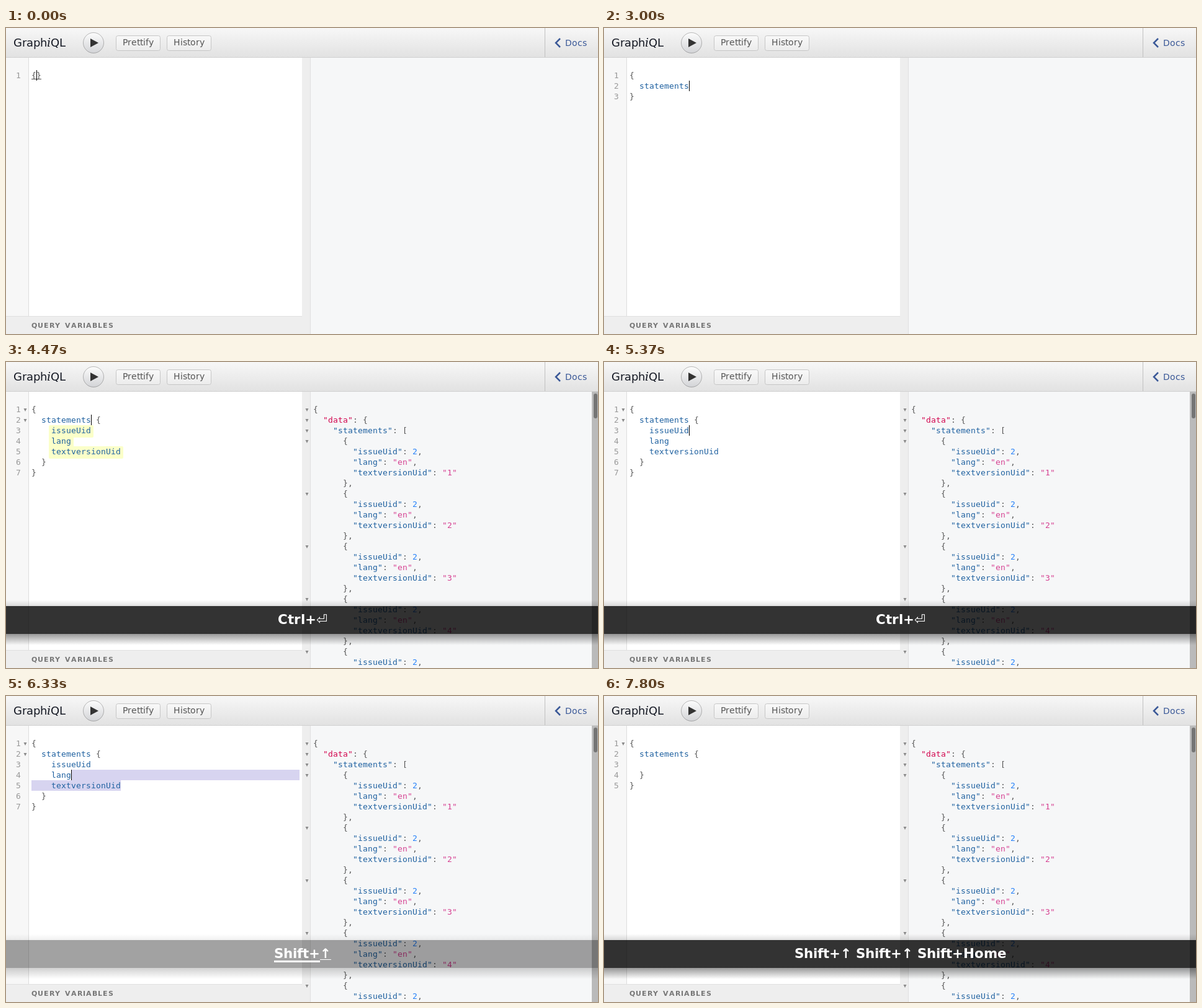
These frames come from a looping animation (954 px wide and 494 px high, 8 s). An HTML page with a canvas:

```html
<!DOCTYPE html>
<html lang="en">
<head>
<meta charset="utf-8">
<title>GraphiQL</title>
<style>
html, body { margin: 0; width: 100%; height: 100%; overflow: hidden; background: #f6f7f8; }
canvas { display: block; width: 954px; height: 494px; }
</style>
</head>
<body>
<canvas id="stage" width="954" height="494"></canvas>
<script>
const ctx = document.getElementById('stage').getContext('2d');
const LOOP = 8000, W = 954, H = 494;
const CHAR = 8, LINE = 17, TOP = 81, LEFT = 41, RESULT = 495;
const SANS = '"DejaVu Sans", sans-serif';
const MONO = '13px "DejaVu Sans Mono", monospace';
const INK = {
  punct: '#555', prop: '#1f61a0', def: '#d2054e', num: '#2882f9',
  str: '#d64292', line: '#999', mark: '#8a8a8a'
};

// Moments of the typed session, in ms
const AT = {
  enter: 600, type: [1050, 1300, 1550, 1800, 2050], down: 2400, pick: 2650,
  run: 3215, result: 3600, moves: [5200, 5400, 5600], end: 5950,
  up1: 6240, up2: 6500, home: 6800, del: 7100
};
const FADE = 200, RECENT = 150, BLINK = 530, FOLD_DELAY = 600;

const hints = ['statement', 'statements', 'statementReference', 'statementReferences'];
const leaves = ['issueUid', 'lang', 'textversionUid'];

const clamp = v => Math.max(0, Math.min(1, v));
const rowY = row => TOP + row * LINE;

function rect(x, y, w, h, fill) {
  ctx.fillStyle = fill;
  ctx.fillRect(x, y, w, h);
}

function roundBox(x, y, w, h, r, fill, stroke) {
  ctx.beginPath();
  ctx.roundRect(x, y, w, h, r);
  if (fill) { ctx.fillStyle = fill; ctx.fill(); }
  if (stroke) { ctx.strokeStyle = stroke; ctx.lineWidth = 1; ctx.stroke(); }
}

function fade(y0, y1, c0, c1) {
  const g = ctx.createLinearGradient(0, y0, 0, y1);
  g.addColorStop(0, c0);
  g.addColorStop(1, c1);
  return g;
}

const advances = new Map();

// Glyph advances are whole pixels, as with hinted text
function advance(ch, font) {
  const id = font + ch;
  if (!advances.has(id)) {
    ctx.font = font;
    advances.set(id, Math.round(ctx.measureText(ch).width));
  }
  return advances.get(id);
}

const widthOf = (s, font) => [...s].reduce((w, ch) => w + advance(ch, font), 0);

// Returns the x where the text ends
function label(s, x, y, font, color, spacing = 0) {
  for (const ch of s) {
    const step = advance(ch, font);
    ctx.font = font;
    ctx.fillStyle = color;
    ctx.fillText(ch, x, y);
    x += step + spacing;
  }
  return x;
}

const code = (s, x, y, color) => label(s, x, y, MONO, color);

function foldMark(x, row) {
  const y = rowY(row) - 6;
  ctx.fillStyle = INK.mark;
  ctx.beginPath();
  ctx.moveTo(x - 2.5, y);
  ctx.lineTo(x + 2.5, y);
  ctx.lineTo(x, y + 5);
  ctx.fill();
}

function topBar() {
  rect(0, 0, W, 47, fade(0, 47, '#f7f7f7', '#e2e2e2'));
  rect(0, 47, W, 1, '#d0d0d0');
  const ink = '#141823';
  let x = label('Graph', 12, 30, '18px ' + SANS, ink);
  x = label('i', x, 30, 'italic 19px "DejaVu Serif", serif', ink);
  label('QL', x, 30, '18px ' + SANS, ink);

  ctx.beginPath();
  ctx.arc(141, 24, 16.5, 0, Math.PI * 2);
  ctx.fillStyle = fade(7, 41, '#fdfdfd', '#d2d3d6');
  ctx.fill();
  ctx.strokeStyle = 'rgba(0,0,0,.25)';
  ctx.lineWidth = 1;
  ctx.stroke();
  ctx.beginPath();
  ctx.moveTo(136, 17);
  ctx.lineTo(149, 24);
  ctx.lineTo(136, 31);
  ctx.fillStyle = '#333';
  ctx.fill();

  [['Prettify', 177], ['History', 259]].forEach(([name, bx]) => {
    roundBox(bx + .5, 12.5, 71, 24, 3, fade(12, 36, '#f9f9f9', '#ececec'), '#c6c6c6');
    label(name, bx + 11, 28, '14px ' + SANS, '#555');
  });

  rect(868, 0, 1, 47, '#c0c0c0');
  ctx.beginPath();
  ctx.moveTo(893, 17);
  ctx.lineTo(886, 24);
  ctx.lineTo(893, 31);
  ctx.strokeStyle = '#3b5998';
  ctx.lineWidth = 2.5;
  ctx.stroke();
  label('Docs', 901, 29, '14px ' + SANS, '#3b5998');
}

function panes() {
  rect(0, 48, 36, H - 48, '#f7f7f7');
  rect(36, 48, 1, H - 48, '#ddd');
  rect(37, 48, 440, H - 48, '#fff');
  rect(477, 48, 13, H - 48, '#eee');
  rect(490, 48, 1, H - 48, '#e0e0e0');
  rect(491, 48, W - 491, H - 48, '#f6f7f8');
  rect(0, 465, 477, 29, '#eee');
  rect(0, 465, 477, 1, '#e0e0e0');
  label('query variables', 41, 484, 'small-caps bold 16px ' + SANS, '#777', 1);
}

// Editor lines as [indent, text, ink]
function documentAt(t) {
  const open = [0, '{', INK.punct], close = [0, '}', INK.punct];
  if (t < AT.enter) return [[0, '{}', INK.punct]];
  if (t < AT.run) {
    const typed = AT.type.filter(k => t >= k).length;
    const word = t >= AT.pick ? 'statements' : 'state'.slice(0, typed);
    return [open, [2, word, INK.prop], close];
  }
  const body = t < AT.del ? leaves.map(s => [4, s, INK.prop]) : [[4, '', INK.prop]];
  return [open, [2, 'statements', INK.prop], ...body, [2, '}', INK.punct], close];
}

// Caret as [time, row, column]
function caretAt(t) {
  const path = [
    [0, 0, 1], [AT.enter, 1, 2],
    ...AT.type.map((k, i) => [k, 1, 3 + i]),
    [AT.pick, 1, 12], [AT.run, 1, 12],
    [AT.moves[0], 2, 12], [AT.moves[1], 3, 8], [AT.moves[2], 4, 11],
    [AT.end, 4, 18], [AT.up1, 3, 8], [AT.up2, 2, 12], [AT.home, 2, 4], [AT.del, 2, 4]
  ];
  return path.filter(p => t >= p[0]).pop();
}

function selection(row, col) {
  const last = 4;
  for (let r = row; r <= last; r++) {
    const x0 = LEFT + (r === row ? col * CHAR : 0);
    const x1 = r === last ? LEFT + 18 * CHAR : 473;
    rect(x0, rowY(r) - 13, x1 - x0, LINE, '#d7d4f0');
  }
}

function editor(t) {
  const [since, row, col] = caretAt(t);
  if (t >= AT.up1 && t < AT.del) selection(row, col);

  if (t >= AT.run && t < AT.moves[0]) {
    ctx.globalAlpha = clamp((t - AT.run) / 900);
    leaves.forEach((s, i) =>
      roundBox(69, rowY(i + 2) - 13, s.length * CHAR + 8, 20, 2, '#fbffc9'));
    ctx.globalAlpha = 1;
  }

  documentAt(t).forEach(([indent, s, color], i) => {
    code(String(i + 1), 16, rowY(i), INK.line);
    code(s, LEFT + indent * CHAR, rowY(i), color);
  });
  if (t < AT.enter) rect(LEFT, rowY(0) + 1, 2 * CHAR, 1, INK.punct);
  if (t >= AT.run) code('{', LEFT + 13 * CHAR, rowY(1), INK.punct);
  if (t >= AT.run + FOLD_DELAY) {
    foldMark(31, 0);
    if (t < AT.del + FOLD_DELAY) foldMark(31, 1);
  }

  const lit = Math.floor((t - since) / BLINK) % 2 === 0;
  if (lit) rect(LEFT + col * CHAR, rowY(row) - 13, 1, LINE, '#000');
}

function hintBox(t) {
  if (t < AT.type[0] + 80 || t >= AT.pick) return;
  const active = t < AT.down ? 0 : 1;
  ctx.save();
  ctx.shadowColor = 'rgba(0,0,0,.45)';
  ctx.shadowBlur = 3;
  ctx.shadowOffsetY = 1;
  rect(57, 103, 189, 112, '#fff');
  ctx.restore();
  hints.forEach((s, i) => {
    const y = 103 + i * 22;
    if (i) rect(57, y, 189, 1, '#f7f7f7');
    if (i === active) rect(57, y, 189, 21, '#08f');
    code(s, 63, y + 15, i === active ? '#fff' : '#141823');
  });
  rect(57, 190, 189, 1, '#c0c0c0');
  label('undefined', 63, 207, '13px ' + SANS, '#ca9800');
  label('Self descriptive.', 135, 207, '13px ' + SANS, '#141823');
}

function spinner(t) {
  if (t < AT.run + 40 || t >= AT.result) return;
  const turn = (t - AT.run - 40) / 600 * Math.PI * 2;
  const arc = (a, b, color) => {
    ctx.beginPath();
    ctx.arc(717, 271, 15, a, b);
    ctx.strokeStyle = color;
    ctx.stroke();
  };
  ctx.lineWidth = 6;
  arc(0, Math.PI * 2, 'rgba(150,150,150,.15)');
  arc(turn - Math.PI * .75, turn - Math.PI * .25, 'rgba(150,150,150,.8)');
}

function result(t) {
  if (t < AT.result) return;
  const { punct, prop, def, num, str } = INK;
  const put = (row, indent, ...list) => list.reduce(
    (x, [s, color]) => code(s, x, rowY(row), color), RESULT + indent * CHAR);
  const open = (row, indent, ...list) => {
    put(row, indent, ...list);
    if (t >= AT.result + FOLD_DELAY) foldMark(485, row);
  };
  open(0, 0, ['{', punct]);
  open(1, 2, ['"data"', def], [': {', punct]);
  open(2, 4, ['"statements"', prop], [': [', punct]);
  for (let n = 1; n <= 5; n++) {
    const r = n * 5 - 2;
    open(r, 6, ['{', punct]);
    put(r + 1, 8, ['"issueUid"', prop], [': ', punct], ['2', num], [',', punct]);
    put(r + 2, 8, ['"lang"', prop], [': ', punct], ['"en"', str], [',', punct]);
    put(r + 3, 8, ['"textversionUid"', prop], [': ', punct], [`"${n}"`, str]);
    put(r + 4, 6, ['},', punct]);
  }
  rect(944, 48, 10, H - 48, '#bababa');
  roundBox(947, 51, 6, 40, 3, '#757575');
}

// Key caption: every chord is [time, modifier, key]
function keyBar(t) {
  const first = t < AT.end;
  const start = first ? AT.run : AT.up1;
  const out = first ? 5670 : LOOP;
  const f = Math.min(clamp((t - start) / FADE), clamp((out + FADE - t) / FADE));
  if (f <= 0) return;

  const shade = a => `rgba(0,0,0,${a * f})`;
  rect(0, 384, W, 10, fade(384, 394, shade(0), shade(.12)));
  rect(0, 439, W, 18, fade(439, 457, shade(.4), shade(0)));
  rect(0, 394, W, 45, shade(.8));

  const chords = first ? [[AT.run, 'Ctrl+', '⏎']] : [
    [AT.up1, 'Shift+', '↑'], [AT.up2, 'Shift+', '↑'], [AT.home, 'Shift+', 'Home']
  ].filter(c => t >= c[0]);
  const plain = '21.33px ' + SANS, bold = 'bold ' + plain;
  const fontOf = s => s === '⏎' ? plain : bold;
  const gap = widthOf(' ', bold);
  const total = chords.reduce(
    (w, [, mod, key]) => w + widthOf(mod, bold) + widthOf(key, fontOf(key)),
    gap * (chords.length - 1));

  ctx.globalAlpha = clamp(f * 3);
  let x = Math.round(W / 2 + .5 - total / 2);
  for (const [at, mod, key] of chords) {
    const recent = t - at < RECENT;
    for (const s of [mod, key]) {
      const x1 = label(s, x, 423, fontOf(s), '#fff');
      if (recent) {
        const thick = s === mod;
        rect(x, thick ? 427 : 425, x1 - x, thick ? 3 : 1, '#fff');
      }
      x = x1;
    }
    x += gap;
  }
  ctx.globalAlpha = 1;
}

function draw(t) {
  panes();
  editor(t);
  result(t);
  spinner(t);
  topBar();
  hintBox(t);
  keyBar(t);
}

const begin = performance.now();
function tick() {
  draw((performance.now() - begin) % LOOP);
  requestAnimationFrame(tick);
}
tick();
</script>
</body>
</html>
```
